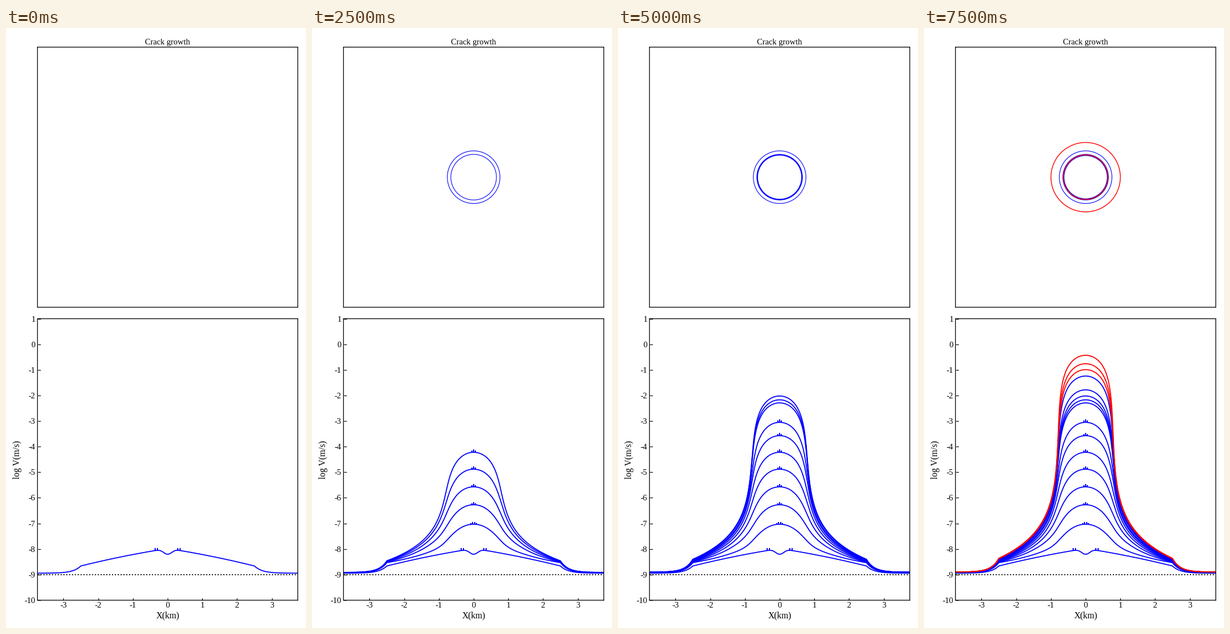
These frames come from a looping animation (529 px wide and 1058 px high, 8 s). A matplotlib script:

```python
import numpy as np
import matplotlib.pyplot as plt
from matplotlib.animation import FuncAnimation
from matplotlib.patches import Circle

W, H, DPI = 529, 1058, 100
PX = 72 / DPI            # points per pixel
STEPS, STEP_MS = 16, 500
BLUE, RED = "#0000ff", "#ff0000"
FIRST_RED = 13

RADIUS = 0.78            # half width of the crack, km
EDGE = 2.5               # where the slow zone ends, km

# Peak log-velocity of each snapshot after the first
PEAKS = [-7.03, -6.27, -5.57, -4.88, -4.22, -3.57, -3.05, -2.29,
         -2.17, -2.02, -1.78, -1.24, -0.99, -0.76, -0.43]

plt.rcParams["font.family"] = "Liberation Serif"


def crest(x, peak):
    """Dome inside the crack, logarithmic decay outside, pinned at both ends."""
    fall = PEAKS[-1] - peak
    width = 0.03 * 1.5 ** fall
    edge = -8.36 - 0.026 * fall
    dist = np.where(x < RADIUS, (x * x - RADIUS ** 2) / (2 * RADIUS), x - RADIUS)

    inner = 0.83
    mid = peak - inner * np.arcsinh(RADIUS / (2 * width))
    outer = (mid - edge) / np.arcsinh((EDGE - RADIUS) / width)

    def shape(d):
        q = d / width
        gain = (inner + outer) / 2 + (outer - inner) / 2 * np.tanh(q)
        return -gain * np.arcsinh(q)

    top, low = shape(-RADIUS / 2), shape(EDGE - RADIUS)
    return edge + (peak - edge) * (shape(dist) - low) / (top - low)


def first_crest(x):
    return -7.98 - 0.21 * x - 0.025 * x * x - 0.22 * np.exp(-(x / 0.16) ** 2)


def profile(step, x):
    x = np.abs(x)
    near = np.minimum(x, EDGE)
    if step == 0:
        y, end = first_crest(near), -8.945
    else:
        peak = PEAKS[step - 1]
        y, end = crest(near, peak), -8.925 + 0.004 * (peak + 7)
    return end + (y - end) * np.exp(-(x - near) / 0.22)


def spikes(step):
    """Position and height of the small ticks riding on a crest."""
    if step > 7:
        return []
    count = {0: 2, 1: 4}.get(step, 3)
    centres = (-0.33, 0.33) if step == 0 else (0,)
    offsets = 0.057 * (np.arange(count) - (count - 1) / 2)
    return [(c + o, 0.11 - 0.7 * abs(o)) for c in centres for o in offsets]


def add_axes(left, top, right, bottom):
    ax = fig.add_axes([left / W, 1 - bottom / H,
                       (right - left) / W, (bottom - top) / H])
    for s in ax.spines.values():
        s.set(linewidth=1.3 * PX, zorder=5, snap=False)
    return ax


def label(x, y, text, size, **kw):
    fig.text(x / W, 1 - y / H, text, fontsize=size * PX, ha="center", **kw)


def add_ring(step, radius, width):
    color = RED if step >= FIRST_RED else BLUE
    ring = Circle((0, 0), radius, fill=False, lw=width * PX, ec=color)
    shown.append((step, plan.add_patch(ring)))


def add_curve(step, x, y, width):
    color = RED if step >= FIRST_RED else BLUE
    line, = graph.plot(x, y, color=color, lw=width * PX,
                       solid_capstyle="butt")
    shown.append((step, line))


fig = plt.figure(figsize=(W / DPI, H / DPI), dpi=DPI, facecolor="white")

plan = add_axes(55.5, 33.7, 514.5, 492.4)
half_w, half_h = 459 / 2, 458.7 / 2
plan.set(xlim=(-half_w, half_w), ylim=(-half_h, half_h), xticks=[], yticks=[])

graph = add_axes(55.5, 512.6, 514.5, 1009)
graph.set(xlim=(-3.75, 3.75), ylim=(-10, 1))
for set_ticks, lo, hi in ((graph.set_xticks, -3, 3), (graph.set_yticks, -10, 1)):
    values = range(lo, hi + 1)
    set_ticks(values, [str(v) for v in values])
graph.tick_params(direction="in", length=4.5 * PX, width=1.2 * PX,
                  labelsize=14.6 * PX, pad=3.5 * PX)

label(285, 28.5, "Crack growth", 14.6, va="baseline")
label(285, 1040, "X(km)", 15.5, va="baseline")
label(20.5, 761, "log V(m/s)", 15.6, va="center", rotation=90)

graph.axhline(-9, color="black", lw=1.9 * PX, ls=(0, (1, 1.65)), zorder=1.5)

shown = []
x = np.linspace(-3.75, 3.75, 1501)
for step in range(STEPS):
    add_curve(step, x, profile(step, x), 1.8)
    for sx, height in spikes(step):
        y = profile(step, sx)
        add_curve(step, [sx, sx], [y, y + height], 2)

add_ring(3, 46.4, 1.1)
for i, step in enumerate((4, 6, 7, 11)):
    add_ring(step, 40.2 - 0.7 * i, 1.1)
add_ring(13, 39.3, 1.5)
add_ring(14, 61.2, 1.4)


def draw(k):
    for step, artist in shown:
        artist.set_visible(step <= k)
    return [artist for _, artist in shown]


anim = FuncAnimation(fig, draw, frames=STEPS, init_func=lambda: draw(0),
                     interval=STEP_MS, repeat=True, repeat_delay=0, blit=False)
plt.show()
```
